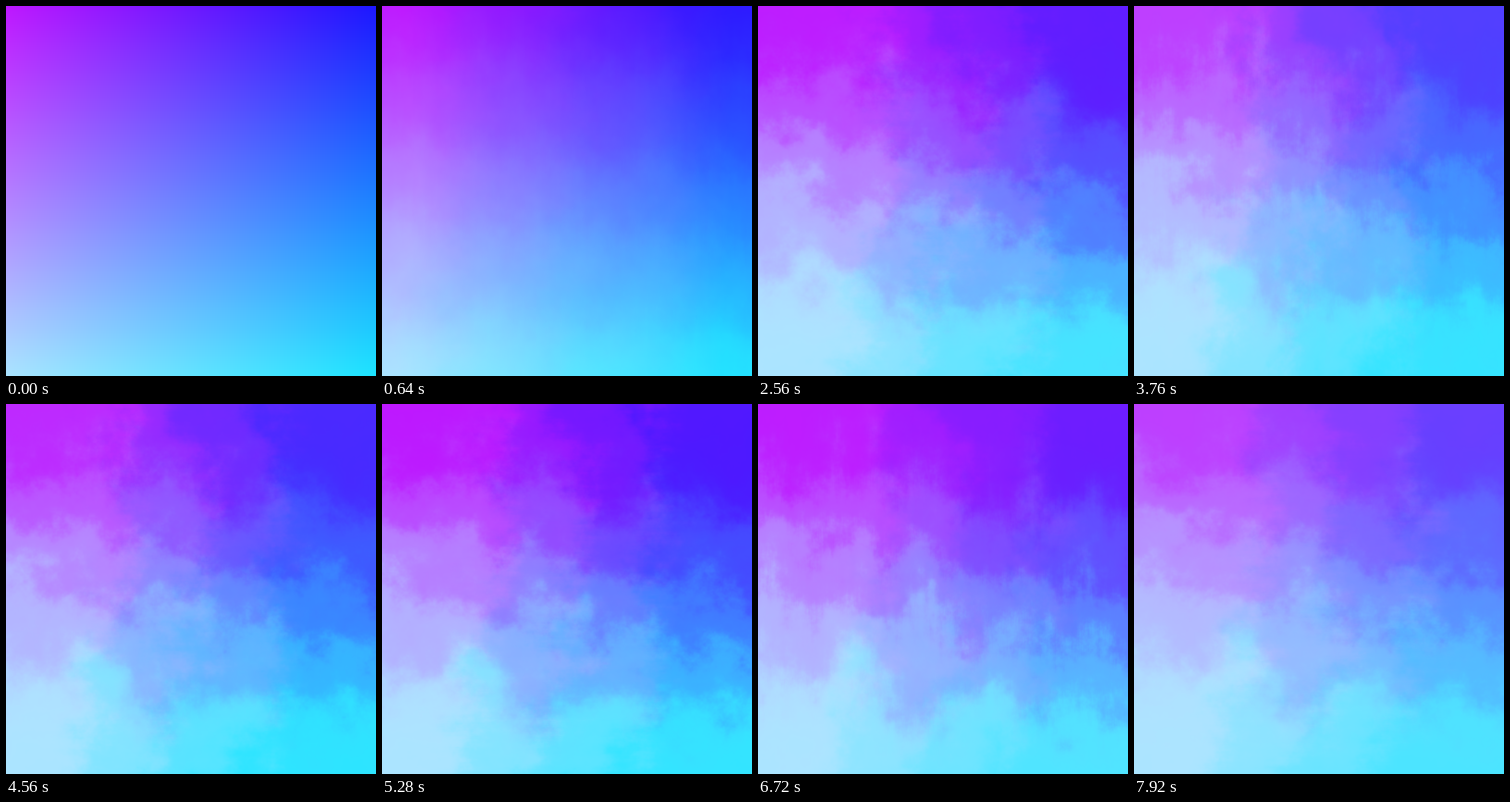
An HTML page with a canvas that plays this animation: 400 px wide and 400 px high, repeating every 8000 ms.

```html
<!DOCTYPE html>
<html lang="en">
<head>
<meta charset="utf-8">
<title>Drifting gradient</title>
<style>
html, body { margin: 0; width: 100%; height: 100%; overflow: hidden; background: #7a60ff; }
canvas { display: block; width: 400px; height: 400px; }
</style>
</head>
<body>
<canvas id="sky" width="400" height="400"></canvas>
<script>
const SIZE = 400, STEP = 80, LOOP = 8000, TILE = 512, MASK = TILE - 1;
const ctx = document.getElementById('sky').getContext('2d');
const img = ctx.createImageData(SIZE, SIZE);
const px = img.data;

function random(seed) {
  return () => {
    seed = (seed * 1664525 + 1013904223) >>> 0;
    return seed / 4294967296;
  };
}

const ease = f => f * f * (3 - 2 * f);
const mix = (a, b, f) => a + (b - a) * f;
const unit = n => n < 0 ? 0 : n > 1 ? 1 : n;
const wave = (t, period) => 0.5 - 0.5 * Math.cos(2 * Math.PI * t / period);

// Seamless fractal noise tile, roughly -1 to 1.
function cloudTile(seed) {
  const rnd = random(seed), out = new Float32Array(TILE * TILE);
  let amp = 0.5;
  for (let cells = 8; cells <= 256; cells *= 2) {
    const grid = Float32Array.from({ length: cells * cells }, () => rnd() * 2 - 1);
    for (let y = 0; y < TILE; y++) {
      const gy = y * cells / TILE, y0 = Math.floor(gy), fy = ease(gy - y0);
      const a = y0 * cells, b = (y0 + 1) % cells * cells;
      for (let x = 0; x < TILE; x++) {
        const gx = x * cells / TILE, x0 = Math.floor(gx), fx = ease(gx - x0);
        const x1 = (x0 + 1) % cells;
        out[y * TILE + x] += amp * mix(
          mix(grid[a + x0], grid[a + x1], fx),
          mix(grid[b + x0], grid[b + x1], fx), fy);
      }
    }
    amp *= 0.62;
  }
  return out;
}

const tileA = cloudTile(11), tileB = cloudTile(47);
const noise = (tile, x, y) => tile[(y & MASK) * TILE + (x & MASK)];

// Pulls a 0..1 ramp towards a few flat levels.
function bands(n, count, strength) {
  const s = n * count, base = Math.floor(s);
  return mix(n, (base + ease(ease(s - base))) / count, strength);
}

function draw(t) {
  const grow = Math.min(1, t / 2000);
  const swing = wave(t, 4700);
  const haze = grow * wave(t - 1680, 4160) ** 2;
  const hair = wave(t + 900, 3000);
  const drift = Math.round(t * 0.012);
  const warp = 0.09 * grow, flat = 0.75 * grow;
  const top = 23 + 40 * haze;
  const right = 28 + 18 * grow + 30 * swing + 0.003 * t;
  const width = 1 - 0.35 * grow;
  let p = 0;

  for (let y = 0; y < SIZE; y++) {
    for (let x = 0; x < SIZE; x++) {
      const wx = noise(tileA, x + drift, y) + noise(tileB, x, y + drift);
      const wy = noise(tileA, x + 211, y + 97 + drift) + noise(tileB, x + 163 - drift, y + 301);
      // Fine streaks lean sideways or upright by turns.
      const sx = noise(tileB, x >> 1, y * 3 + drift) * (1 - hair);
      const sy = noise(tileA, x * 3 + drift, y >> 1) * hair;
      const u = unit(x / SIZE + warp * (wx + 0.6 * sx));
      const v = unit(y / SIZE + warp * (wy + 0.6 * sy));

      // Green deepens downwards, sooner on the left.
      const bulge = 4 * v * (1 - v);
      const h = unit(v + grow * bulge * (0.22 * (0.5 - u) + 0.04 * haze));
      const depth = bands(mix(h, ease(h), grow), 4, flat);

      // Red falls off across a bowed divide.
      const bow = 0.12 * Math.sin(Math.PI * v) - 0.08 * v - 0.05 + 0.04 * swing;
      const side = bands(unit((u - 0.5 - grow * bow) / width + 0.5), 3, flat);

      px[p++] = mix(190 - 20 * v, right + 15 * grow * (1 - 2 * v), side);
      px[p++] = mix(top, 228, depth);
      px[p++] = 255;
      px[p++] = 255;
    }
  }
  ctx.putImageData(img, 0, 0);
}

const start = performance.now();
let shown = -1;
function tick() {
  const now = Math.max(0, performance.now() - start) % LOOP;
  const step = Math.floor(now / STEP);
  if (step !== shown) {
    shown = step;
    draw(step * STEP);
  }
  requestAnimationFrame(tick);
}
tick();
</script>
</body>
</html>
```
